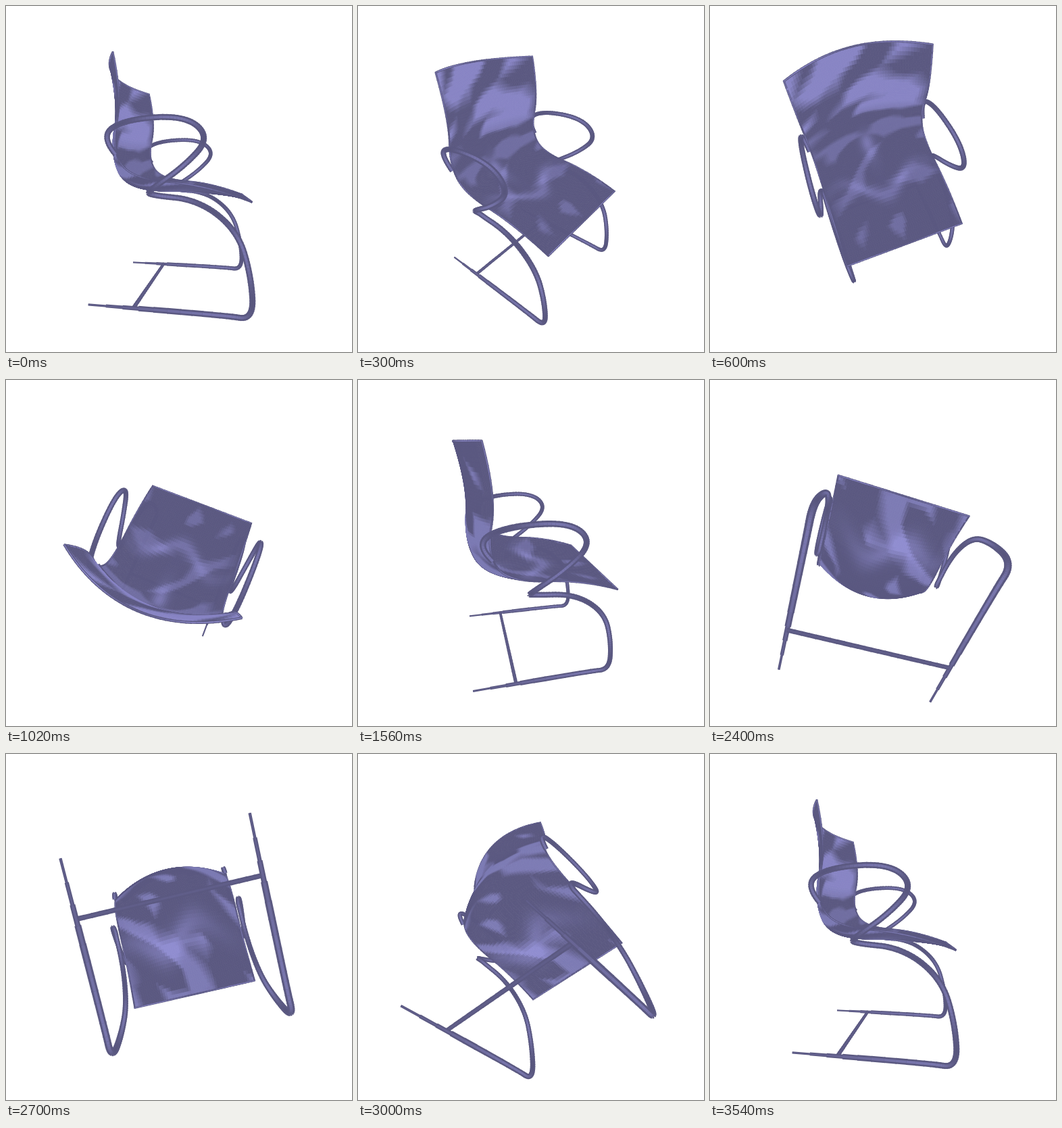
These frames come from a looping animation (512 by 512 pixels, 3600 ms). An HTML page with a canvas:

```html
<!DOCTYPE html>
<html lang="en">
<head>
<meta charset="utf-8">
<title>Turning chair</title>
<style>
  html, body { margin: 0; width: 100%; height: 100%; overflow: hidden; background: #fff; }
  canvas { display: block; width: 512px; height: 512px; }
</style>
</head>
<body>
<canvas id="stage" width="512" height="512"></canvas>
<script>
const ctx = document.getElementById('stage').getContext('2d');
const FOCUS = 420, HALF = 87, STEP = 60, FRAMES = 60;
const DARK = [91, 89, 129], LIGHT = [144, 141, 208];

// Side view control points [front, up]: cloth edge, cloth middle, and the bent tube.
const EDGE = [[-68, 154], [-56, 100], [-70, 38], [-46, 0], [46, -7], [96, -26]];
const MID = [[-97, 154], [-84, 100], [-94, 30], [-74, -18], [40, -18], [96, -26]];
const ARM = [[-64, 30], [-82, 52], [-50, 70], [22, 72], [50, 46], [20, 14], [-22, -14]];
const LEG = [[-22, -19], [36, -24], [80, -58], [95, -108], [98, -158], [66, -154.5], [-98, -153.5]];
const TUBE = [...ARM, ...LEG];

const clamp = x => Math.max(0, Math.min(1, x));
const lerp = (a, b, t) => a + (b - a) * t;
const ridge = (x, w) => Math.exp(-((x / w) ** 2));
const mix = t => `rgb(${DARK.map((d, i) => Math.round(lerp(d, LIGHT[i], t)))})`;

// Quadratic B-spline through the end points; t counts spans.
function spline(pts, t) {
  const last = pts.length - 3, i = Math.min(Math.floor(t), last), f = t - i;
  return [0, 1].map(k => {
    const c = pts[i + 1][k];
    const a = i ? (pts[i][k] + c) / 2 : pts[0][k];
    const b = i < last ? (c + pts[i + 2][k]) / 2 : pts[i + 2][k];
    return lerp(lerp(a, c, f), lerp(c, b, f), f);
  });
}

function cloth(u, v) {
  const e = spline(EDGE, v), m = spline(MID, v), bow = 1 - u * u;
  return [lerp(e[0], m[0], bow), lerp(e[1], m[1], bow), u * HALF];
}

function random(x, y, seed) {
  const n = Math.sin(x * 127.1 + y * 311.7 + seed * 74.7) * 43758.5453;
  return n - Math.floor(n);
}

// Noise over triangles, which gives the cloth its angular patches.
function facets(x, y, seed) {
  const i = Math.floor(x), j = Math.floor(y), f = x - i, g = y - j;
  const at = (p, q) => random(i + p, j + q, seed);
  return f > g
    ? at(0, 0) * (1 - f) + at(1, 0) * (f - g) + at(1, 1) * g
    : at(0, 0) * (1 - g) + at(0, 1) * (g - f) + at(1, 1) * f;
}

function shadeTop(u, v) {
  const seat = clamp((v - 1) * 2);
  const folds = clamp((facets(u * 3 + 9, v * 3.5, 3) - .56 + .22 * (1 - seat) * (1 - u * u)) / .2);
  const spine = ridge(u, .12) * ridge(v - 2.3, .35);
  const crease = ridge(v - 3.1 - .2 * Math.cos(u * 4), .1) * ridge(u, .7);
  return mix(clamp(folds * lerp(.85, .4, seat) + spine * .6 + crease * .5));
}

function shadeUnder(u, v) {
  const folds = clamp((facets(u * 3 + 9, v * 3, 8) - .56) / .2);
  const band = ridge(v - 3.25 + .15 * Math.sin(u * 5), .18) * ridge(u + .2, .7);
  return mix(clamp(folds * .65 + band * .6));
}

const points = [], quads = [], bars = [];
const add = p => points.push(p) - 1;

function buildCloth(nu, nv) {
  const id = [];
  for (let j = 0; j <= nv; j++) {
    id.push([]);
    for (let i = 0; i <= nu; i++) id[j].push(add(cloth(i / nu * 2 - 1, j / nv * 4)));
  }
  for (let j = 0; j < nv; j++) for (let i = 0; i < nu; i++) {
    const u = (i + .5) / nu * 2 - 1, v = (j + .5) / nv * 4;
    quads.push({
      ids: [id[j][i], id[j][i + 1], id[j + 1][i + 1], id[j + 1][i]],
      top: shadeTop(u, v), under: shadeUnder(u, v)
    });
  }
}

function buildBar(path, n, width, gloss) {
  let last = add(path(0));
  for (let i = 1; i <= n; i++) {
    const next = add(path(i / n));
    bars.push({ ids: [last, next], width: width(i / n), gloss: mix(gloss(i / n)) });
    last = next;
  }
}

// The arm rest leans outwards; the leg below stays upright.
function tube(t, side) {
  const s = t * (TUBE.length - 2);
  return [...spline(TUBE, s), side * (89 + 9 * Math.sin(Math.PI * clamp(s / 6.5)))];
}

buildCloth(56, 80);
for (const side of [1, -1]) {
  buildBar(t => tube(t, side), 168, t => 6.8 * Math.min(1, .4 + (1 - t) * 30), t => .25 + .3 * Math.sin(t * 34 + 1));
  buildBar(t => cloth(side, t * 4), 54, () => 2.2, t => .35 + .35 * Math.sin(t * 24));
}
for (const v of [0, 4]) buildBar(t => cloth(t * 2 - 1, v), 40, () => 2.4, t => .55 + .35 * Math.sin(t * 9));
buildBar(t => [-41, -153, 89 * (1 - 2 * t)], 24, () => 4.8, () => .1);

function project(yaw, pitch) {
  const cy = Math.cos(yaw), sy = Math.sin(yaw), cp = Math.cos(pitch), sp = Math.sin(pitch);
  return points.map(([a, b, r]) => {
    const x = a * cy + r * sy, z = r * cy - a * sy;
    const depth = b * sp + z * cp, k = FOCUS / (FOCUS - depth);
    return { x: 256 + x * k, y: 256 - (b * cp - z * sp) * k, z: depth, k };
  });
}

function drawQuad(q, [a, b, c, d]) {
  const turn = (b.x - a.x) * (d.y - a.y) - (b.y - a.y) * (d.x - a.x);
  ctx.fillStyle = ctx.strokeStyle = turn < 0 ? q.top : q.under;
  ctx.lineWidth = .8;
  ctx.beginPath();
  for (const p of [a, b, c, d]) ctx.lineTo(p.x, p.y);
  ctx.closePath();
  ctx.fill();
  ctx.stroke();
}

function drawBar(bar, [a, b]) {
  const len = Math.hypot(b.x - a.x, b.y - a.y) || 1, w = bar.width * (a.k + b.k) / 2;
  const ex = (b.x - a.x) / len * .8, ey = (b.y - a.y) / len * .8;
  const line = (color, width) => {
    ctx.strokeStyle = color;
    ctx.lineWidth = width;
    ctx.beginPath();
    ctx.moveTo(a.x - ex, a.y - ey);
    ctx.lineTo(b.x + ex, b.y + ey);
    ctx.stroke();
  };
  line(mix(0), w);
  line(bar.gloss, w * .42);
}

function draw(frame) {
  const t = frame / (FRAMES - 1) * 2 * Math.PI;
  // The view stays upright, so it swings round when passing over a pole.
  const yaw = -t - .15 + (Math.cos(t) < 0 ? Math.PI : 0);
  const view = project(yaw, Math.asin(Math.sin(t)));
  const items = [];
  const push = (list, paint, lift) => {
    for (const o of list) {
      const ps = o.ids.map(i => view[i]);
      items.push({ o, ps, paint, z: ps.reduce((s, p) => s + p.z, 0) / ps.length + lift });
    }
  };
  push(quads, drawQuad, 0);
  push(bars, drawBar, 1.5);
  items.sort((a, b) => a.z - b.z);
  ctx.fillStyle = '#fff';
  ctx.fillRect(0, 0, 512, 512);
  for (const { o, ps, paint } of items) paint(o, ps);
}

let shown = -1;
function tick() {
  const frame = Math.floor(performance.now() / STEP) % FRAMES;
  if (frame !== shown) draw(shown = frame);
  requestAnimationFrame(tick);
}
ctx.lineJoin = 'round';
tick();
</script>
</body>
</html>
```
